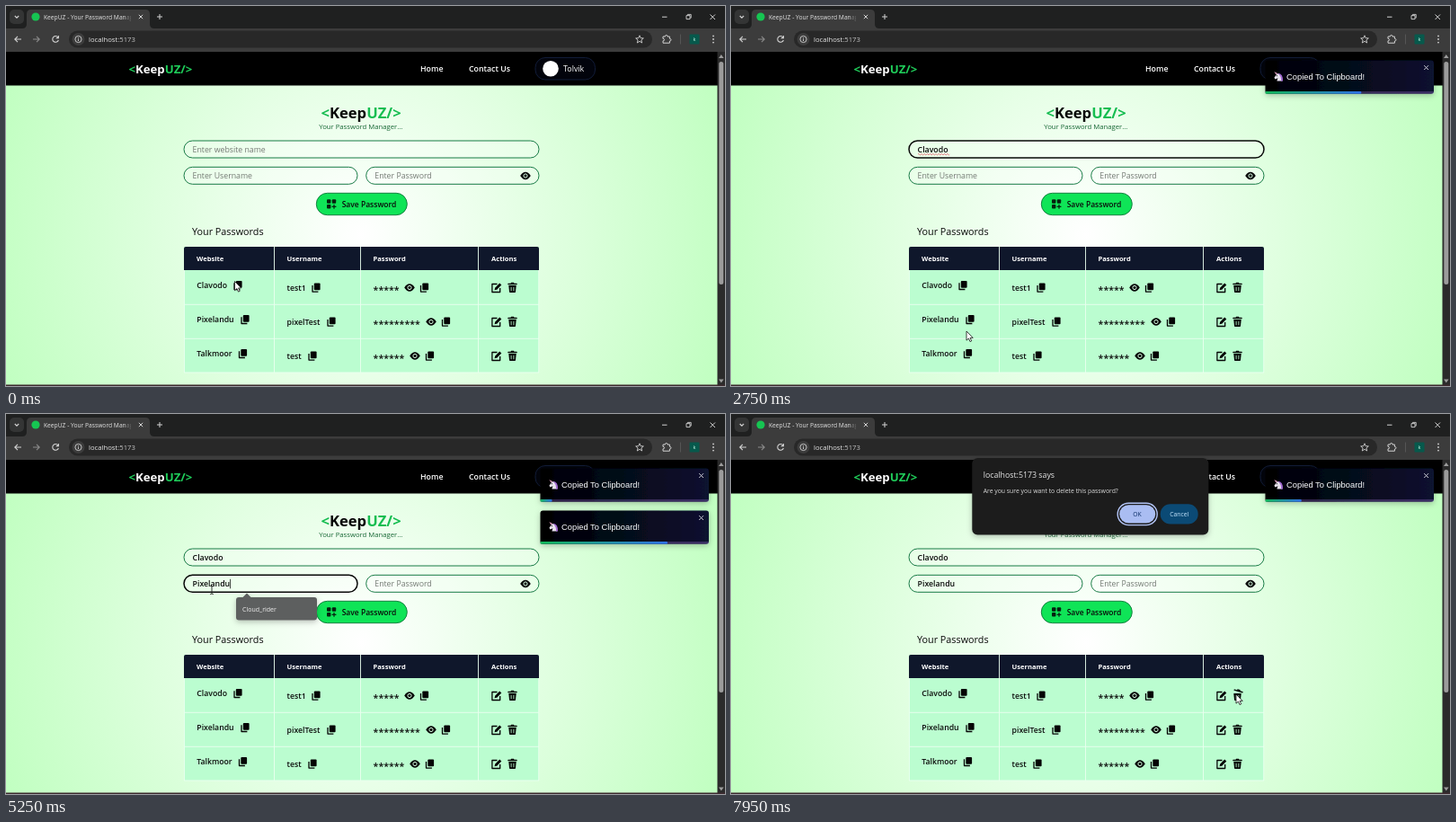
Recreate the animation shown at these times as an HTML page. Size 800 by 423 pixels, loop 8000 ms.

```html
<!DOCTYPE html>
<html lang="en">
<head>
<meta charset="utf-8">
<title>Password manager</title>
<style>
html, body { margin: 0; width: 100%; height: 100%; overflow: hidden; background: #1f2020; }
svg { display: block; width: 100vw; height: 100vh; }
text { font-family: "Open Sans", "Noto Sans", sans-serif; white-space: pre; }
.toast text { font-family: "Liberation Sans", Arial, sans-serif; }
</style>
</head>
<body>
<svg id="stage" viewBox="0 0 800 423" xmlns="http://www.w3.org/2000/svg"></svg>
<script>
const LOOP = 8000;
const stage = document.getElementById('stage');

// Markup helpers
const text = (x, y, size, str, fill = '#0a0a0a', weight = 600, extra = '') =>
  `<text x="${x}" y="${y}" font-size="${size}" font-weight="${weight}" fill="${fill}" ${extra}>${str}</text>`;
const rect = (x, y, w, h, fill, r = 0, extra = '') =>
  `<rect x="${x}" y="${y}" width="${w}" height="${h}" rx="${r}" fill="${fill}" ${extra}/>`;
const line = (d, stroke, width = 1, extra = '') =>
  `<path d="${d}" fill="none" stroke="${stroke}" stroke-width="${width}" ${extra}/>`;
const at = (x, y, body, id = '') => `<g ${id && `id="${id}"`} transform="translate(${x} ${y})">${body}</g>`;
const brand = (x, y, size, green, plain) =>
  text(x, y, size, `&lt;<tspan fill="${plain}">Keep</tspan>UZ/&gt;`, green, 700);

// Icons, centred on 0,0
const copy = (x, y) => at(x, y,
  rect(-2.2, -5, 6.8, 7.8, '#050505', 1) + line('M-4 -2.6V4.6H2.4', '#050505', 1.3, 'stroke-linejoin="round"'));
const eye = (x, y) => at(x, y,
  '<path d="M-5.8 0Q-3 -4.2 0 -4.2T5.8 0Q3 4.2 0 4.2T-5.8 0Z" fill="#050505"/>' +
  '<circle r="2.1" fill="none" stroke="#d9ffe4" stroke-width="1"/>');
const edit = (x, y) => at(x, y,
  line('M1 -4H-4.6V5H4.2V0.6', '#050505', 1.3, 'stroke-linejoin="round"') +
  '<path d="M-2 2.8L-1.4 0.2L3.7 -5L5.8 -3L0.7 2.2Z" fill="#050505"/>');
const trash = (x, y, lidId = '') => at(x, y,
  '<path d="M-4.2 -2.4H4.2L3.5 4.8Q3.4 5.6 2.6 5.6H-2.6Q-3.4 5.6 -3.5 4.8Z" fill="#050505"/>' +
  line('M-1.4 -0.6V3.8M1.4 -0.6V3.8', '#b9f8cf', .9) +
  `<g ${lidId && `id="${lidId}"`}>${rect(-5.2, -4.8, 10.4, 1.5, '#050505', .5)}${rect(-1.8, -5.8, 3.6, 1.4, '#050505', .5)}</g>`);
const unicorn = at(609, 78.5,
  '<path d="M-1 -3.5L-4.6 1.2L-3.4 3L-.6 1.8L-1.6 5H4.4Q4.8 -2.4 -1 -3.5Z" fill="#e8e2ee"/>' +
  '<path d="M-.6 -3.8Q5.6 -3 5 5H3Q3.4 -.6 -.6 -3.8Z" fill="#a06ad0"/>' +
  '<path d="M-4.6 -5.4L-1 -3.6L-2.4 -2Z" fill="#e6a4c8"/><circle cx="-1.6" cy="-.8" r=".6" fill="#333"/>');

const defs = `<defs>
  <radialGradient id="page" gradientUnits="userSpaceOnUse" cx="395" cy="255" r="440">
    <stop stop-color="#fff"/><stop offset="1" stop-color="#bfffbf"/></radialGradient>
  <linearGradient id="night"><stop stop-color="#000103"/><stop offset="1" stop-color="#0b1230"/></linearGradient>
  <linearGradient id="bar"><stop stop-color="#12b859"/><stop offset="1" stop-color="#2f6fe6"/></linearGradient>
  <linearGradient id="tabfade"><stop offset=".85" stop-color="#e3e3e3"/><stop offset="1" stop-color="#3c3c3c"/></linearGradient>
  <filter id="shade" x="-10%" y="-30%" width="120%" height="170%">
    <feDropShadow dx="0" dy="2" stdDeviation="3" flood-color="#000" flood-opacity=".25"/></filter>
</defs>`;

function chrome() {
  const grey = '#d2d2d2';
  return rect(0, 0, 800, 51, '#1f2020') +
    rect(4, 4, 16, 16, '#343535', 5) + line('M9.8 11L12 13.2L14.2 11', grey, 1.1) +
    '<path d="M18 25Q23 25 23 20V9Q23 4 28 4H155Q160 4 160 9V20Q160 25 165 25Z" fill="#3c3c3c"/>' +
    '<circle cx="33" cy="12" r="4.6" fill="#16c552"/>' +
    `<svg x="42" y="0" width="97" height="25">${text(0, 14.6, 6.7, 'KeepUZ - Your Password Manager', 'url(#tabfade)', 400)}</svg>` +
    rect(134, 6, 10, 12, '#3c3c3c', 0, 'opacity=".55"') +
    line('M147.8 9.8L152.2 14.2M152.2 9.8L147.8 14.2', grey, 1) +
    line('M171 9V15M168 12H174', grey, 1) +
    line('M730 12.2H735.5', grey, 1) +
    line('M757 10.6H761V14.6H757ZM758.4 10.4V9.4H762.2V13.2H761.2', grey, .9) +
    line('M783.5 9.5L789 15M789 9.5L783.5 15', grey, 1) +
    rect(0, 25, 800, 26, '#3c3c3c') +
    line('M17 37H10M13 33.8L9.8 37L13 40.2', grey, 1.1) +
    line('M30 37H37M34 33.8L37.2 37L34 40.2', '#8b8b8b', 1.1) +
    line('M58 35A3.4 3.4 0 1 0 58.4 38M58.4 33V35.6H55.8', grey, 1.1) +
    rect(70, 27.5, 649, 19, '#282828', 9.5) +
    '<circle cx="80.5" cy="37" r="7" fill="#3c3c3c"/>' +
    '<circle cx="80.5" cy="37" r="3.6" fill="none" stroke="#d2d2d2" stroke-width=".9"/>' +
    line('M80.5 36.6V39M80.5 35V35.8', grey, .9) +
    text(92, 39.8, 7.7, 'localhost<tspan fill="#c4c4c4">:5173</tspan>', '#e6e6e6', 400) +
    line('M705 32.8L706.2 35.7L709.3 35.9L706.9 37.9L707.7 41L705 39.3L702.3 41L703.1 37.9L700.7 35.9L703.8 35.7Z', grey, .9) +
    line('M731 34H733.4Q733.4 32.4 734.7 32.4T736 34H738.4V36.4Q740 36.4 740 37.7T738.4 39V41.2H731V38.8Q732.6 38.8 732.6 37.6T731 36.4Z', grey, 1) +
    line('M750.5 31.5V42.5', '#5c5c5c', .8) +
    rect(760.5, 31.5, 11, 11, '#07594c', 1) + text(766, 39.2, 5.5, 'k', '#cfe', 400, 'text-anchor="middle"') +
    [33.4, 37, 40.6].map(y => `<circle cx="787" cy="${y}" r=".9" fill="${grey}"/>`).join('');
}

function field(id, x, y, w, hint) {
  return rect(x, y, w, 19, '#fff', 9.5, `id="${id}Box" fill-opacity=".25" stroke="#177a45" stroke-width="1"`) +
    text(x + 9.6, y + 12.8, 8.75, hint, '#737973', 500, `id="${id}Text"`) +
    line(`M${x + 10} ${y + 4.5}v10.5`, '#111', .8, `id="${id}Caret"`);
}

function table() {
  const rows = [
    ['Clavodo', 258, 'test1', 345, 5, 449],
    ['Pixelandu', 266, 'pixelTest', 362, 9, 473],
    ['Talkmoor', 263.5, 'test', 341, 6, 455],
  ];
  const heads = [['Website', 212], ['Username', 312.5], ['Password', 408.5], ['Actions', 540]];
  return rect(198, 268, 395, 140, '#bbfdd0', 1.5) +
    '<path d="M198 294V270Q198 268 200 268H591Q593 268 593 270V294Z" fill="#0f172b"/>' +
    heads.map(([s, x]) => text(x, 284, 7.6, s, '#fff', 700)).join('') +
    line('M198.5 294V408M298.5 268V408M394.5 268V408M525.5 268V408M592.7 294V408M198 332.3H593M198 370.3H593M198 408H593', '#eafff0', .9) +
    rows.map(([site, sx, login, lx, n, ex], i) => {
      const y = 313.5 + 38 * i;
      return text(212.3, y + .5, 8.7, site) + copy(sx, y - 2.6) +
        text(312.6, y + 3.4, 8.7, login) + copy(lx, y) +
        text(408.6, y + 6, 10.6, '*'.repeat(n)) + eye(ex, y) + copy(ex + 16.5, y) +
        edit(545.5, y) + trash(563.5, y, i ? '' : 'lid');
    }).join('');
}

function page() {
  return rect(0, 88, 792, 335, 'url(#page)') + rect(0, 51, 792, 37.5, '#000') +
    brand(136.5, 75.3, 13.2, '#1fce5a', '#fff') +
    text(461, 73.2, 8.8, 'Home', '#fff') + text(515, 73.2, 8.8, 'Contact Us', '#fff') +
    rect(589, 57.5, 66.5, 24.5, '#02040c', 11, 'stroke="#111c38" stroke-width="1"') +
    '<circle cx="606" cy="69.7" r="8.8" fill="#fff"/>' + text(620, 73, 8.9, 'Tolvik', '#fff', 500) +
    brand(350.5, 125, 16.6, '#16bd51', '#050505') +
    text(348.3, 136.8, 7.7, 'Your Password Manager...', '#166534', 500) +
    field('site', 198, 150, 395, 'Enter website name') +
    line('M208 165.2' + 'q.8 -1.4 1.6 0t1.6 0'.repeat(11), '#e0384a', .7, 'id="squiggle"') +
    field('login', 198, 179.3, 193, 'Enter Username') +
    field('pass', 400.7, 179.3, 192.3, 'Enter Password') + eye(578, 189) +
    rect(345.3, 208.3, 101, 24.4, '#0fe457', 12.2, 'stroke="#158040" stroke-width="1"') +
    rect(357, 215.3, 4.4, 4.4, '#06210f', 1) + rect(362.8, 215.3, 4.4, 4.4, '#06210f', 1) +
    rect(357, 221, 4.4, 4.4, '#06210f', 1) + line('M365 220.9V225.7M362.6 223.3H367.4', '#06210f', 1.2) +
    text(373.7, 223.8, 8.5, 'Save Password') +
    text(207, 255, 10.8, 'Your Passwords', '#0a0a0a', 500) +
    table() +
    '<g id="hint"><path d="M259 204H263.5L268 199.5L272.5 204H343Q346 204 346 207V226.5Q346 229.5 343 229.5H259Q256 229.5 256 226.5V207Q256 204 259 204Z" fill="#5d5f5e" filter="url(#shade)"/>' +
    text(263, 219.6, 7, 'Cloud_rider', '#f0f0f0', 400) + '</g>' +
    rect(791.5, 51, 8.5, 372, '#2b2b2b') + rect(793.3, 62, 5, 248, '#9c9c9c', 2.5) +
    '<path d="M793 58L795.8 54L798.6 58ZM793 415.5L795.8 419.5L798.6 415.5Z" fill="#9c9c9c"/>' +
    rect(0, 421.5, 800, 1.5, '#3d2a2f');
}

const toast = id => `<g class="toast" id="${id}">` +
  rect(594.5, 60.5, 187.5, 37.3, 'url(#night)', 3, 'filter="url(#shade)"') + unicorn +
  text(618, 81.8, 9.35, 'Copied To Clipboard!', '#fff', 400) +
  line('M771.2 66.2L776 71M776 66.2L771.2 71', '#c9ccd4', 1) +
  rect(594.5, 95, 187.5, 2.8, '#bb86fc', 1, 'opacity=".25"') +
  rect(594.5, 95, 187.5, 2.8, 'url(#bar)', 1, `id="${id}Bar"`) + '</g>';

const dialog = '<g id="dialog">' +
  rect(268.3, 49, 263, 85.5, '#1f1f1f', 6, 'filter="url(#shade)"') +
  text(280.7, 71, 8.8, 'localhost:5173 says', '#e6e6e6', 500) +
  text(280.7, 87.6, 6.85, 'Are you sure you want to delete this password?', '#dcdcdc', 400) +
  rect(430.2, 99.2, 44, 24.4, 'none', 12.2, 'stroke="#b3c5f7" stroke-width="1.4"') +
  rect(432.2, 101.2, 40, 20.4, '#aabdf2', 10.2) +
  text(452, 113.9, 6.8, 'OK', '#0b2d66', 500, 'text-anchor="middle"') +
  rect(477.7, 100.2, 42, 22.4, '#0b4a75', 11.2) +
  text(498.7, 113.9, 6.8, 'Cancel', '#c6e6ff', 500, 'text-anchor="middle"') + '</g>';

const pointer = '<g id="arrow"><path d="M0 0V10.2L2.4 8L4 11.6L5.7 10.8L4.1 7.4H7.2Z" fill="#fff" stroke="#111" stroke-width=".8" stroke-linejoin="round"/></g>' +
  `<g id="beam">${line('M-1.8 -4.6Q0 -4.6 0 -3.6Q0 -4.6 1.8 -4.6M0 -3.6V3.6M-1.8 4.6Q0 4.6 0 3.6Q0 4.6 1.8 4.6', '#222', .9)}</g>`;

stage.innerHTML = defs + page() + chrome() + toast('first') + toast('second') + dialog + at(0, 0, pointer, 'cursor');

const el = {};
stage.querySelectorAll('[id]').forEach(n => el[n.id] = n);
const show = (node, on) => node.setAttribute('display', on ? 'inline' : 'none');
const clamp = x => Math.max(0, Math.min(1, x));
const easeOut = x => 1 - (1 - x) ** 3;
const easeInOut = x => x * x * (3 - 2 * x);

// Interpolates [time, value...] stops
function track(stops, t, ease) {
  const i = stops.findIndex(s => s[0] > t);
  if (i < 0) return stops[stops.length - 1].slice(1);
  if (i === 0) return stops[0].slice(1);
  const a = stops[i - 1], b = stops[i];
  const k = ease((t - a[0]) / (b[0] - a[0]));
  return a.slice(1).map((v, j) => v + (b[j + 1] - v) * k);
}

// Seconds, x, y of the pointer tip
const path = [
  [0, 254.5, 306.5], [.3, 254.5, 306.5], [1.1, 251, 160], [2.3, 251, 160], [2.75, 262, 362],
  [3, 265, 347], [3.2, 265, 347], [3.65, 262, 313], [3.85, 262, 313], [4.4, 229, 196],
  [5.6, 229, 196], [6.65, 561, 321.5], [6.95, 561, 321.5], [7.2, 562, 312],
];
// Seconds, x offset, opacity
const bounceIn = [[0, 1760, 0], [.42, -14.6, 1], [.525, 5.9, 1], [.63, -2.9, 1], [.7, 0, 1]];
const bounceOut = [[0, 0, 1], [.14, -11.7, 1], [.7, 1172, 0]];

function drawToast(id, t, enter, start, y) {
  const end = start + 5;
  const [x, alpha] = t < end ? track(bounceIn, t - enter, easeOut) : track(bounceOut, t - end, easeInOut);
  show(el[id], t >= enter && t < end + .7);
  el[id].setAttribute('transform', `translate(${x} ${y})`);
  el[id].setAttribute('opacity', alpha);
  el[id + 'Bar'].setAttribute('width', 187.5 * clamp(1 - (t - start) / 5));
}

function drawField(id, t, focus, paste, blur, hint, value) {
  const on = t >= focus && t < blur, filled = t >= paste;
  const box = el[id + 'Box'], label = el[id + 'Text'], caret = el[id + 'Caret'];
  box.setAttribute('stroke', on ? '#080808' : '#177a45');
  box.setAttribute('stroke-width', on ? 1.5 : 1);
  label.textContent = filled ? value : hint;
  label.setAttribute('fill', filled ? '#0a0a0a' : '#737973');
  label.setAttribute('font-weight', filled ? 600 : 500);
  show(caret, on && (t - (filled ? paste : focus)) % 1 < .5);
  caret.setAttribute('transform', `translate(${filled ? label.getComputedTextLength() : 0} 0)`);
}

function draw(ms) {
  const t = ms / 1000;
  drawField('site', t, 1.2, 2.2, 3.05, 'Enter website name', 'Clavodo');
  drawField('login', t, 4.45, 5.05, 7.4, 'Enter Username', 'Pixelandu');
  show(el.passCaret, false);
  show(el.squiggle, t >= 2.2 && t < 3.05);
  show(el.hint, t >= 4.5 && t < 5.75);
  drawToast('first', t, -.12, .6, 0);
  drawToast('second', t, 3.17, 4.025, 47 * (1 - easeInOut(clamp((t - 6.3) / .3))));
  show(el.dialog, t >= 7.4);
  el.lid.setAttribute('transform', `translate(0 ${-1.2 * clamp((t - 7.15) / .2)}) rotate(${16 * clamp((t - 7.15) / .2)})`);

  const [x, y] = track(path, t, easeInOut);
  const typing = x > 198 && x < 593 && (y > 150 && y < 169 || y > 179 && y < 198.5);
  show(el.beam, typing);
  show(el.arrow, !typing);
  el.cursor.setAttribute('transform', `translate(${x} ${y})`);
}

const began = performance.now();
function tick() {
  draw((performance.now() - began) % LOOP);
  requestAnimationFrame(tick);
}
tick();
</script>
</body>
</html>
```
